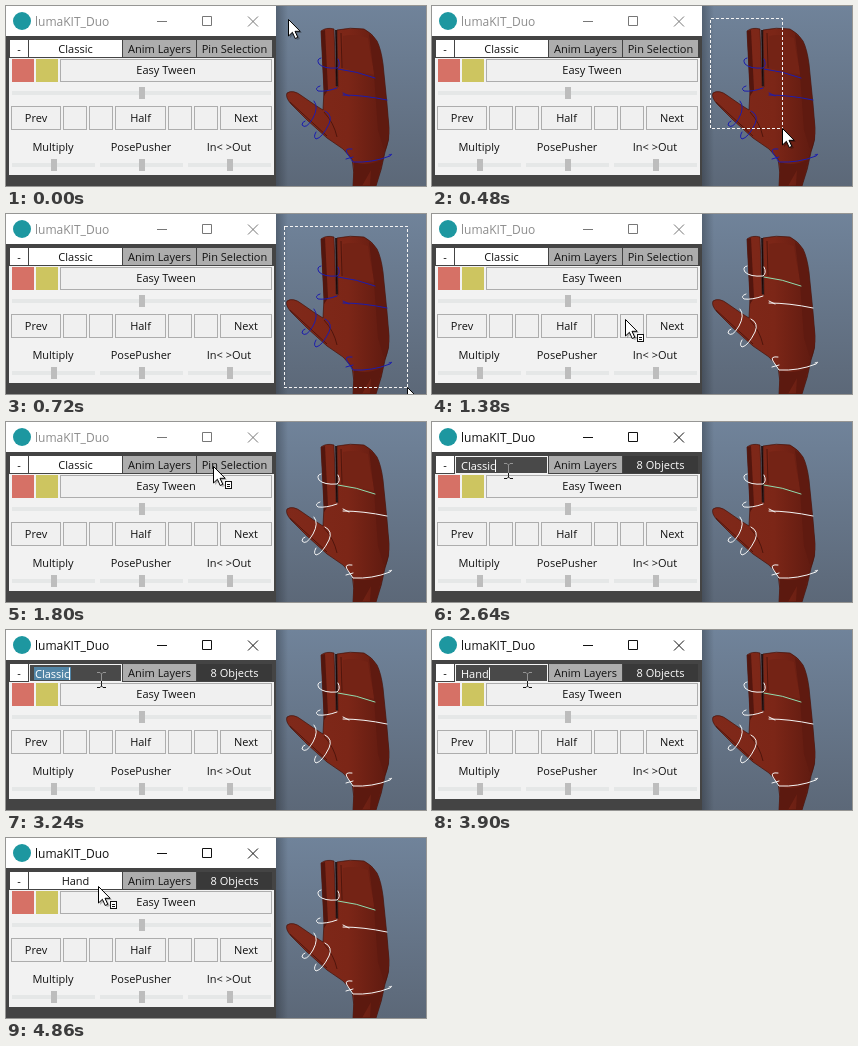
An HTML page that plays this animation: 420 px wide and 180 px high, repeating every 5.04 s.

```html
<!DOCTYPE html>
<html lang="en">
<head>
<meta charset="utf-8">
<title>Rename a set</title>
<style>
html, body { margin: 0; width: 100%; height: 100%; overflow: hidden; background: #444; }
svg { display: block; width: 420px; height: 180px; }
text { font: 11px "Open Sans", "Noto Sans", sans-serif; fill: #111; text-anchor: middle; }
text.left { text-anchor: start; }
rect { shape-rendering: crispEdges; }
#title { font-size: 12px; }
#beam { mix-blend-mode: difference; }
</style>
</head>
<body>
<svg id="stage" viewBox="0 0 420 180">
  <defs>
    <linearGradient id="sky" x2="0" y2="1">
      <stop stop-color="#70839a"/><stop offset="1" stop-color="#5c6878"/>
    </linearGradient>
    <linearGradient id="shade">
      <stop stop-opacity=".25"/><stop offset="1" stop-opacity="0"/>
    </linearGradient>
    <linearGradient id="skin">
      <stop stop-color="#80291a"/><stop offset=".6" stop-color="#7c2617"/><stop offset="1" stop-color="#5e1a10"/>
    </linearGradient>
  </defs>

  <rect x="270" width="150" height="180" fill="url(#sky)"/>
  <rect x="270" width="12" height="180" fill="url(#shade)"/>

  <g id="hand" stroke-linejoin="round">
    <path fill="url(#skin)" stroke="#45130b" stroke-width=".7" d="M315 25Q320 21 328 23L330 80 332 81 331 24Q344 21 358 23 366 27 371 35 375 43 377 58L381 98 383 122Q384 134 379 146 376 163 370 180H347Q349 166 346 153L337 143 321 132 301 114 285 98Q279 91 281 87 287 83 296 90L309 99 317 104 318 84Z"/>
    <path fill="#742315" d="M337 30Q350 27 362 32 364 48 369 69L336 62Z"/>
    <path fill="#5f1a10" d="M363 28Q371 33 374 46L378 72 383 122Q384 134 378 143L372 124 368 68Z"/>
    <path fill="#53160e" d="M315 25L319 24 322 84 318 90Z"/>
    <path fill="#5c190f" d="M348 156Q360 161 376 154L370 180H364L365 164 356 180H347Z"/>
    <path fill="none" stroke="#50150c" d="M335 27L336 62M318 106Q328 117 331 131M284 96L321 130"/>
    <path fill="none" stroke="#1d0806" stroke-width="1.6" d="M330 24L331 80"/>
  </g>

  <g id="rings" fill="none" stroke-linecap="round">
    <path d="M315 52Q310 53 313 58 318 63 331 62 335 59 332 53"/>
    <path id="lead" d="M332 63Q350 65 369 72"/>
    <path d="M314 80Q308 82 312 85 320 86 331 82"/>
    <path d="M337 89Q357 89 381 94M337 87L343 90"/>
    <path d="M308 95Q313 101 307 112 300 124 296 119 296 116 299 115"/>
    <path d="M319 105Q327 109 323 118 316 132 310 133 307 131 310 126"/>
    <path d="M346 143Q338 142 341 147L347 156Q366 157 384 150 388 147 383 149M340 153L347 151"/>
  </g>
  <rect id="marquee" fill="none" stroke="#f4f4f4" stroke-dasharray="3 2"/>

  <g id="win">
    <rect width="270" height="180" fill="#444"/>
    <rect width="270" height="30" fill="#fff"/>
    <circle cx="16" cy="15" r="9" fill="#1d97a0"/>
    <text id="title" class="left" x="29" y="20">lumaKIT_Duo</text>
    <path id="chrome" fill="none" d="M151 15.5H161M196.5 10.5H205.5V19.5H196.5ZM242 10.5L252 20.5M252 10.5L242 20.5"/>
    <rect x="3" y="52" width="265" height="117" fill="#f2f2f2"/>
  </g>
  <g id="edit">
    <rect x="23.5" y="34.5" width="92" height="17" fill="#494949" stroke="#f4f4f4"/>
    <rect id="mark" x="28" y="37" width="37" height="13" fill="#5285a6"/>
    <text id="typed" class="left" x="29" y="48" style="fill:#fff"></text>
    <path id="caret" stroke="#fff" d="M0 37.5V50"/>
  </g>
  <path id="beam" fill="none" stroke="#ddd" d="M-4 -7.5H-1L.5 -6 2 -7.5H5M.5 -6V6M-4 7.5H-1L.5 6 2 7.5H5"/>
  <g id="arrow">
    <path fill="#000" opacity=".25" d="M2 2V19L6 15 9 21 12 20 9 14H14Z"/>
    <path fill="#fff" stroke="#000" d="M.5 .5V17L4.4 13.3 7.2 19.5 9.8 18.3 7 12.3H12.2Z"/>
    <g id="badge">
      <rect x="12.5" y="15.5" width="6" height="7" fill="#fff" stroke="#111"/>
      <path stroke="#111" d="M14 18.5H17M14 20.5H17"/>
    </g>
  </g>
</svg>
<script>
const $ = id => document.getElementById(id);
const LOOP = 5040, TICK = 60;

function add(tag, attrs, text) {
  const el = document.createElementNS("http://www.w3.org/2000/svg", tag);
  for (const k in attrs) el.setAttribute(k, attrs[k]);
  if (text) el.textContent = text;
  return $("win").appendChild(el);
}
const box = (x, y, width, height, fill, stroke = "none") =>
  add("rect", { x, y, width, height, fill, stroke });
const label = (x, y, text) => add("text", { x, y }, text);

function button(x, y, w, h, text) {
  box(x + .5, y + .5, w - 1, h - 1, "#f0f0f0", "#adadad");
  if (text) label(x + w / 2, y + h - 8, text);
}
function slider(x, y, w) {
  box(x, y - 2, w, 4, "#e5e7e7");
  box(x + w / 2 - 3, y - 6, 6, 12, "#bdbdbd");
}
function cell(x, w, fill, text) {
  const rect = box(x, 34, w, 17, fill);
  return [rect, label(x + w / 2, 47, text)];
}

cell(4, 18, "#fff", "-");
const [, tab] = cell(23, 93, "#fff", "Classic");
cell(117, 73, "#adadad", "Anim Layers");
const [pin, pinText] = cell(191, 75, "#adadad", "Pin Selection");

box(6, 53, 22, 23, "#d67166");
box(30, 53, 22, 23, "#cdc560");
button(54, 53, 212, 23, "Easy Tween");
slider(6, 87, 259);
[[5, 50, "Prev"], [57, 24], [83, 24], [109, 51, "Half"], [162, 24], [188, 24], [214, 52, "Next"]]
  .forEach(([x, w, text]) => button(x, 100, w, 24, text));
["Multiply", "PosePusher", "In<\u00a0>Out"].forEach((text, i) => {
  label(47 + i * 88, 145, text);
  slider(6 + i * 88, 159, 83);
});

// Pointer stops: time, x, y
const path = [
  [0, 282, 13], [60, 278, 12], [180, 322, 94], [360, 322, 94], [660, 401, 173],
  [840, 401, 173], [1380, 193, 105], [1500, 193, 105], [1740, 207, 44],
  [2220, 207, 44], [2460, 76, 49], [2640, 76, 49], [2940, 95, 50],
  [4380, 95, 50], [4440, 92, 48], [LOOP, 92, 48]
];
const typing = [[0, "Classic"], [3600, "H"], [3660, "Ha"], [3720, "Han"], [3840, "Hand"]];

function pointer(t) {
  const i = path.findIndex(p => p[0] > t);
  const [t0, x0, y0] = path[i - 1], [t1, x1, y1] = path[i];
  let u = (t - t0) / (t1 - t0);
  u = u * u * (3 - 2 * u);
  return [Math.round(x0 + (x1 - x0) * u), Math.round(y0 + (y1 - y0) * u)];
}
const show = (id, on) => { $(id).style.display = on ? "" : "none"; };
const set = (el, key, value) => el.setAttribute(key, value);

function draw(now) {
  const t = Math.floor(now % LOOP / TICK) * TICK;
  const [x, y] = pointer(t);
  const selected = t >= 780, active = t >= 1860, pinned = t >= 1920;
  const editing = t >= 2580 && t < 4380;

  show("marquee", t >= 60 && !selected);
  set($("marquee"), "x", 278.5);
  set($("marquee"), "y", 12.5);
  set($("marquee"), "width", Math.max(0, x - 278));
  set($("marquee"), "height", Math.max(0, y - 12));
  set($("rings"), "stroke", selected ? "#f4f4f4" : "#1c1cae");
  set($("lead"), "stroke", selected ? "#91dcae" : "#1c1cae");

  $("title").style.fill = active ? "#111" : "#8c8c8c";
  set($("chrome"), "stroke", active ? "#111" : "#777");
  set(pin, "fill", pinned ? "#393939" : "#adadad");
  pinText.textContent = pinned ? "8 Objects" : "Pin Selection";
  pinText.style.fill = pinned ? "#fff" : "#111";

  tab.textContent = t >= 4380 ? "Hand" : "Classic";
  show("edit", editing);
  if (editing) {
    $("typed").textContent = typing.filter(s => s[0] <= t).pop()[1];
    const end = Math.round(29 + $("typed").getComputedTextLength()) + .5;
    set($("caret"), "transform", `translate(${end} 0)`);
    show("mark", t >= 3240 && t < 3600);
    show("caret", t < 4140);
  }

  const place = `translate(${x} ${y})`;
  show("beam", editing);
  show("arrow", !editing);
  show("badge", x < 270);
  set($("beam"), "transform", place);
  set($("arrow"), "transform", place);
}

const start = performance.now();
function loop() {
  draw(performance.now() - start);
  requestAnimationFrame(loop);
}
loop();
</script>
</body>
</html>
```
